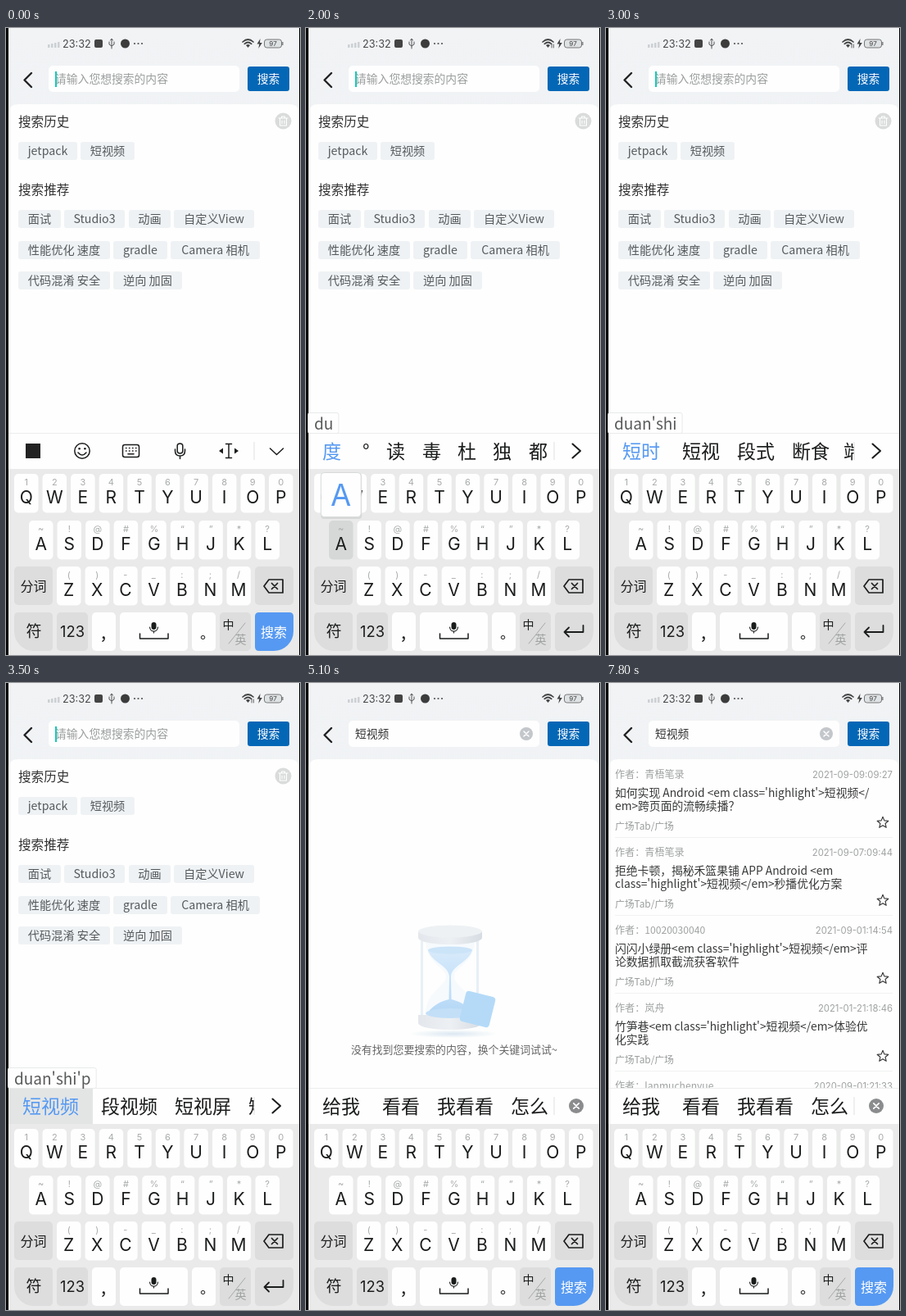
Animation, 359 px wide and 765 px high, one loop 8 s. Source, as an HTML page:

```html
<!DOCTYPE html>
<html lang="zh-CN">
<head>
<meta charset="utf-8">
<style>
html, body { margin: 0; width: 100%; height: 100%; overflow: hidden; background: #000; }
svg { display: block; width: 359px; height: 765px; }
text { font-family: "Noto Sans CJK SC", "Noto Sans CJK JP", "Noto Sans CJK", sans-serif; white-space: pre; }
.wide { font-family: Inter, sans-serif; }
</style>
</head>
<body>
<svg id="stage" viewBox="0 0 359 765">
  <defs>
    <linearGradient id="sky" x2="0" y2="1"><stop stop-color="#f1f3f5"/><stop offset="1" stop-color="#ebf0f5"/></linearGradient>
    <linearGradient id="cap" x2="1" y2="0"><stop stop-color="#e3e7ec"/><stop offset=".5" stop-color="#edf0f3"/><stop offset="1" stop-color="#d6dce3"/></linearGradient>
    <linearGradient id="sand" x2="0" y2="1"><stop stop-color="#d9ebfb"/><stop offset="1" stop-color="#b3d7f6"/></linearGradient>
    <radialGradient id="shade"><stop stop-color="#dbe7f2"/><stop offset="1" stop-color="#dbe7f2" stop-opacity="0"/></radialGradient>
    <clipPath id="strip"><rect x="3" y="494" width="300" height="45"/></clipPath>
  </defs>
</svg>
<script>
const LOOP = 8000;
const INK = '#1b1c1c', BLUE = '#5699f2', PAPER = '#fdfefd', KEY = '#fdfefd', DIM = '#dcdddc';
const stage = document.getElementById('stage');

function el(parent, tag, attrs = {}, content) {
  const node = document.createElementNS('http://www.w3.org/2000/svg', tag);
  for (const k in attrs) node.setAttribute(k, attrs[k]);
  if (content !== undefined) node.textContent = content;
  return parent.appendChild(node);
}
const group = (parent = stage, attrs) => el(parent, 'g', attrs);
const rect = (p, x, y, width, height, fill, rx = 0) => el(p, 'rect', { x, y, width, height, fill, rx });
const disc = (p, cx, cy, r, fill) => el(p, 'circle', { cx, cy, r, fill });
const oval = (p, cx, cy, rx, ry, fill) => el(p, 'ellipse', { cx, cy, rx, ry, fill });
const shape = (p, d, fill) => el(p, 'path', { d, fill });
const line = (p, d, stroke = INK, width = 1.5) => el(p, 'path', {
  d, stroke, 'stroke-width': width, fill: 'none', 'stroke-linecap': 'round', 'stroke-linejoin': 'round' });
const text = (p, x, y, size, fill, str, anchor = 'start') =>
  el(p, 'text', { x, y, 'font-size': size, fill, 'text-anchor': anchor }, str);
// Latin letters and digits with the broader cut
function wide(...args) {
  const node = text(...args);
  node.setAttribute('class', 'wide');
  return node;
}
const show = (node, on) => node.setAttribute('display', on ? 'inline' : 'none');

// Page background and status bar
rect(stage, 3, 0, 355, 765, 'url(#sky)');
const bar = group();
[0, 1, 2, 3].forEach(i => rect(bar, 51 + i * 4, 20 - i, 2.5, 4 + i, '#cdd0d2', .5));
wide(bar, 69, 24, 12.7, '#48494a', '23:32');
rect(bar, 108, 14, 10, 10, '#444', 2);
line(bar, 'M129 14V25M126 17V20L129 22L132 20V17M127.5 15L129 13L130.5 15', '#555', 1);
disc(bar, 145.5, 19, 5.5, '#3c3c3c');
[157, 161.5, 166].forEach(x => disc(bar, x, 19, 1.1, '#555'));
line(bar, 'M289 17Q295.5 11 302 17M291.3 19.4Q295.5 15.6 299.7 19.4', '#444', 1.7);
shape(bar, 'M293 21Q295.5 19 298 21L295.5 24Z', '#444');
const traffic = group(bar);
line(traffic, 'M300 20V24M302.3 20V24', '#666', 1);
shape(bar, 'M310.5 13L306.5 19.5H309.3L308.3 25L312.8 18H310Z', '#444');
el(bar, 'rect', { x: 315.5, y: 14, width: 21, height: 10, rx: 3, fill: '#dfe2e4', stroke: '#777' });
rect(bar, 337.2, 17, 1.3, 4, '#777');
wide(bar, 326, 22, 8, '#444', '97', 'middle');

// Search header
const head = group();
line(head, 'M31 55L22.5 63.5L31 72', '#222', 2.4);
rect(head, 52, 46, 233, 32, PAPER, 5);
const hint = text(head, 60, 67, 13.8, '#9b9d9e', '请输入您想搜索的内容');
const query = group(head);
text(query, 60, 67, 13.8, '#333', '短视频');
disc(query, 269, 62, 8, '#c3c6ca');
line(query, 'M266 59L272 65M272 59L266 65', '#fff', 1.5);
const caret = rect(head, 60, 53, 2, 19, '#13c9b8');
rect(head, 295, 47, 51, 30, '#0467b6', 3);
text(head, 320.5, 67, 13.8, '#fff', '搜索', 'middle');
shape(stage, 'M3 540V105Q3 93 15 93H346Q358 93 358 105V540Z', PAPER);

// History and suggestions
const home = group();
text(home, 15, 120, 15.6, '#333', '搜索历史');
text(home, 15, 203, 15.6, '#333', '搜索推荐');
disc(home, 338.5, 113.5, 10, '#dadbdb');
line(home, 'M333 110H344M336.5 110V108H340.5V110M334.5 110V119H342.5V110M337 113V116.5M340 113V116.5', '#fff', 1.1);
for (const [y, ...tags] of [
  [139, 15, 72, 'jetpack', 91, 66, '短视频'],
  [222, 15, 52, '面试', 71, 74, 'Studio3', 150, 51, '动画', 205, 98, '自定义View'],
  [260, 15, 112, '性能优化 速度', 131, 66, 'gradle', 201, 109, 'Camera 相机'],
  [297, 15, 112, '代码混淆 安全', 131, 84, '逆向 加固']
]) for (let i = 0; i < tags.length; i += 3) {
  rect(home, tags[i], y, tags[i + 1], 22, '#eff2f4', 3);
  text(home, tags[i] + tags[i + 1] / 2, y + 16, 14.2, '#555a5d', tags[i + 2], 'middle');
}

// Nothing found
const empty = group();
oval(empty, 180, 428, 54, 5, 'url(#shade)');
rect(empty, 140, 308, 3, 100, '#e8eff7');
rect(empty, 208, 308, 3, 100, '#e8eff7');
shape(empty, 'M146 312C145 342 171 346 171 358C171 371 145 377 146 405H206C207 377 181 371 181 358C181 346 207 342 206 312Z', '#f6fafd');
shape(empty, 'M149 326Q176 318 203 326C199 341 178 344 177 358L177.5 386C187 388 198 394 203 402Q176 412 149 402C154 394 165 388 174.5 386L175 358C174 344 153 341 149 326Z', 'url(#sand)');
oval(empty, 176, 326, 27, 4.5, '#cce4f8');
for (const [y, h] of [[303, 8], [405, 10]]) {
  shape(empty, `M137 ${y}V${y + h}A39 8 0 0 0 215 ${y + h}V${y}Z`, 'url(#cap)');
  if (y < 400) oval(empty, 176, y, 39, 7.5, '#eef1f4');
}
oval(empty, 176, 403, 30, 6, '#c3dff7');
el(empty, 'rect', { x: 191, y: 379, width: 37, height: 38, rx: 4, fill: '#b4daf8', transform: 'rotate(14 209.5 398)' });
text(empty, 181, 452, 12.9, '#666', '没有找到您要搜索的内容，换个关键词试试~', 'middle');

// Result list
const list = group();
[
  ['青梧笔录', '2021-09-09:09:27', "如何实现 Android <em class='highlight'>短视频</", 'em>跨页面的流畅续播？'],
  ['青梧笔录', '2021-09-07:09:44', '拒绝卡顿，揭秘禾篮果铺 APP Android <em', "class='highlight'>短视频</em>秒播优化方案"],
  ['10020030040', '2021-09-01:14:54', "闪闪小绿册<em class='highlight'>短视频</em>评", '论数据抓取截流获客软件'],
  ['岚舟', '2021-01-21:18:46', "竹笋巷<em class='highlight'>短视频</em>体验优", '化实践'],
  ['lanmuchenyue', '2020-09-01:21:33', '', '']
].forEach(([author, date, a, b], i) => {
  const g = group(list, { transform: `translate(0 ${i * 95})` });
  text(g, 11, 116, 12.1, '#a0a2a3', '作者：' + author);
  wide(g, 350, 116, 11.3, '#a0a2a3', date, 'end');
  text(g, 11, 138.5, 13.8, '#383939', a);
  text(g, 11, 154.5, 13.8, '#383939', b);
  text(g, 11, 179, 11.8, '#999b9c', '广场Tab/广场');
  let star = '';
  for (let k = 0; k < 10; k++) {
    const r = k % 2 ? 3.2 : 7.2, n = k * Math.PI / 5;
    star += (k ? 'L' : 'M') + (338 + r * Math.sin(n)).toFixed(2) + ' ' + (170.5 - r * Math.cos(n)).toFixed(2);
  }
  line(g, star + 'Z', '#333', 1.1);
  rect(g, 11, 188, 339, 1, '#f0f1f1');
});

// Keyboard
const board = group();
rect(board, 3, 538, 355, 227, '#e9eae9');
rect(board, 3, 494, 355, 44, PAPER);
rect(board, 3, 494, 355, 1, '#eceded');
const keys = {};
[
  ['QWERTYUIOP', '1234567890', 10, 544],
  ['ASDFGHJKL', '~!@#%“”*?', 28, 601],
  ['ZXCVBNM', '()-_:;/', 62, 657]
].forEach(([letters, hints, x0, y]) => [...letters].forEach((c, i) => {
  const x = x0 + i * 34.56, mid = x + 14.7;
  keys[c] = { mid, y, face: rect(board, x, y, 29.5, 47.5, KEY, 5) };
  wide(board, mid, y + 13.5, 11, '#a9abab', hints[i], 'middle');
  wide(board, mid, y + 35.5, 21, INK, c, 'middle');
}));
rect(board, 10, 657, 47, 47, DIM, 5);
text(board, 33.5, 686.5, 16, INK, '分词', 'middle');
rect(board, 304, 657, 47, 47, DIM, 5);
line(board, 'M321 673H338V689H321L315 681Z', INK, 1.7);
line(board, 'M324.5 677.5L331.5 684.5M331.5 677.5L324.5 684.5', INK, 1.7);
shape(board, 'M15 713H52Q57 713 57 718V755Q57 760 52 760H34A24 24 0 0 1 10 736V718Q10 713 15 713Z', DIM);
text(board, 34, 743, 19, INK, '符', 'middle');
rect(board, 62, 713, 38, 47, DIM, 5);
wide(board, 81, 743, 18.3, INK, '123', 'middle');
rect(board, 105, 713, 29, 47, KEY, 5);
text(board, 119, 745, 22, INK, ',', 'middle');
rect(board, 139, 713, 83, 47, KEY, 5);
rect(board, 177.5, 725, 6, 9, INK, 3);
line(board, 'M175.5 731Q176 736 180.5 736Q185 736 185.5 731M180.5 736V738', INK, 1.1);
line(board, 'M163.5 739V745H198V739', INK, 1.5);
rect(board, 227, 713, 29, 47, KEY, 5);
text(board, 237, 745, 18, INK, '。');
rect(board, 261, 713, 38, 47, DIM, 5);
text(board, 264.5, 733, 14, INK, '中');
text(board, 279.5, 751, 14, '#9fa1a2', '英');
line(board, 'M272 751L292 726', '#a7a9a9', 1);
const corner = shape(board, 'M309 713H346Q351 713 351 718V736A24 24 0 0 1 327 760H309Q304 760 304 755V718Q304 713 309 713Z', BLUE);
const goLabel = text(board, 327, 743, 16, '#fff', '搜索', 'middle');
const enter = line(board, 'M338.5 729V737H315.5M321 731.5L315.5 737L321 742.5', INK, 1.8);

// Toolbar above the keys
const tools = group(board);
rect(tools, 24, 507, 18, 18, '#222');
el(tools, 'circle', { cx: 93, cy: 516, r: 9.2, fill: 'none', stroke: INK, 'stroke-width': 1.5 });
disc(tools, 89.6, 513.3, 1.3, INK);
disc(tools, 96.4, 513.3, 1.3, INK);
line(tools, 'M88 518Q93 524 98 518');
line(tools, 'M145 508.5H160Q162.5 508.5 162.5 511V521Q162.5 523.5 160 523.5H145Q142.5 523.5 142.5 521V511Q142.5 508.5 145 508.5Z');
line(tools, 'M146.5 512.5H147M150.5 512.5H151M154.5 512.5H155M158.5 512.5H159M146.5 516H147M150.5 516H151M154.5 516H155M158.5 516H159M149 519.8H156', INK, 1.6);
line(tools, 'M212.5 507Q215.8 507 215.8 510V516Q215.8 519 212.5 519Q209.2 519 209.2 516V510Q209.2 507 212.5 507ZM206.5 514V516Q206.5 522 212.5 522Q218.5 522 218.5 516V514M212.5 522V525.5');
line(tools, 'M268.5 507.5H275.5M272 507.5V524.5M268.5 524.5H275.5');
shape(tools, 'M260 516L265 512.5V519.5ZM284 516L279 512.5V519.5Z', INK);
line(tools, 'M322.5 513L330.5 520.5L338.5 513');

// Candidate row
const words = group(board, { 'clip-path': 'url(#strip)' });
rect(board, 302.5, 505, 1, 22, '#dfe0e0');
const more = line(board, 'M325.5 507.5L335 516L325.5 524.5', INK, 2);
const dismiss = group(board);
disc(dismiss, 330, 516, 9, '#8b8c8d');
line(dismiss, 'M326.8 512.8L333.2 519.2M333.2 512.8L326.8 519.2', '#fff', 1.7);

// Composed letters and key bubble
const compose = group();
const box = el(compose, 'rect', { x: 2.5, y: 469.5, height: 25, rx: 2, fill: PAPER, stroke: '#e9eaea' });
const typed = text(compose, 10, 490, 19, '#58595a', '');
const bubble = group();
el(bubble, 'rect', { x: -24.5, y: -1, width: 50, height: 56, rx: 4, fill: '#b9bbbb', opacity: .4 });
el(bubble, 'rect', { x: -24.5, y: -1.5, width: 49, height: 54, rx: 4, fill: PAPER, stroke: '#d8dada' });
const bubbleText = wide(bubble, 0, 38.5, 36.5, BLUE, '', 'middle');

// Steps: [time, value]
const blinks = [0, 100, 700, 1200, 1600, 2100, 2600, 3100, 3500, 4100, 4600, 5100, 5500, 6000, 6400, 6900, 7400, 7800];
// A lower-case letter darkens its key without the bubble.
const presses = [[0, ''], [1500, 'D'], [1600, ''], [1900, 'U'], [2000, 'A'], [2100, ''], [2300, 'N'], [2400, ''],
  [2500, 'S'], [2600, ''], [2700, 'H'], [2800, ''], [2900, 'I'], [3000, ''], [3100, 'p'], [3200, 'P'], [3300, '']];
const typing = [[0, ''], [1600, 'd'], [2000, 'du'], [2100, 'dua'], [2400, 'duan'], [2600, "duan's"],
  [2800, "duan'sh"], [3000, "duan'shi"], [3300, "duan'shi'p"], [3700, '']];
const choices = {
  "d": '20 的 64 都 108 到 152 对 196 但 240 得 284 大',
  "du": '20 度 69 ° 98 读 142 毒 185 杜 228 独 272 都',
  "dua": '20 段 64 短 108 断 152 端 196 锻 240 缎 284 度',
  "duan": '20 段 69 Duang 161 短 205 断 247 端 290 都',
  "duan's": '20 短时 93 段数 160 短视 227 端上 290 段',
  "duan'sh": '20 短时 93 短视 160 端上 227 段数 290 段',
  "duan'shi": '20 短时 93 短视 160 段式 227 断食 290 端',
  "duan'shi'p": '20 短视频 116 段视频 206 短视屏 296 短',
  "next": '20 给我 93 看看 160 我看看 250 怎么'
};
const at = (steps, t) => steps.reduce((value, s) => t >= s[0] ? s[1] : value, '');

function fillWords(name, picked) {
  words.replaceChildren();
  if (picked) rect(words, 3, 495, 103, 43, '#e3e5e5');
  const parts = (choices[name] || '').split(' ');
  for (let i = 0; i + 1 < parts.length; i += 2)
    text(words, parts[i], 525, 23, i || name === 'next' ? INK : BLUE, parts[i + 1]);
}

let last = '';
function draw(t) {
  const done = t >= 3700, str = at(typing, t), press = at(presses, t), picked = t >= 3500 && !done;
  show(caret, blinks.filter(b => b <= t).length % 2);
  caret.setAttribute('x', done ? 101 : 60);
  show(hint, !done);
  show(query, done);
  show(traffic, t >= 1900 && t < 3700 || t >= 5700 && t < 6600);
  show(home, t < 4900);
  show(empty, t >= 4900 && t < 5500);
  show(list, t >= 5500);
  show(tools, !str && !done);
  show(more, str);
  show(dismiss, done);
  show(goLabel, !str);
  show(enter, str);
  corner.setAttribute('fill', str ? DIM : BLUE);
  show(compose, str);
  for (const c in keys) keys[c].face.setAttribute('fill', c === press.toUpperCase() ? '#d6d8d7' : KEY);
  const key = keys[press];
  show(bubble, key);
  if (key) {
    bubble.setAttribute('transform', `translate(${key.mid} ${key.y - 57})`);
    bubbleText.textContent = press;
  }
  const state = (done ? 'next' : str) + picked;
  if (state !== last) {
    last = state;
    fillWords(done ? 'next' : str, picked);
    typed.textContent = str;
    box.setAttribute('width', typed.getComputedTextLength() + 14);
  }
}

const start = performance.now();
function tick() {
  draw((performance.now() - start) % LOOP);
  requestAnimationFrame(tick);
}
tick();
</script>
</body>
</html>
```
